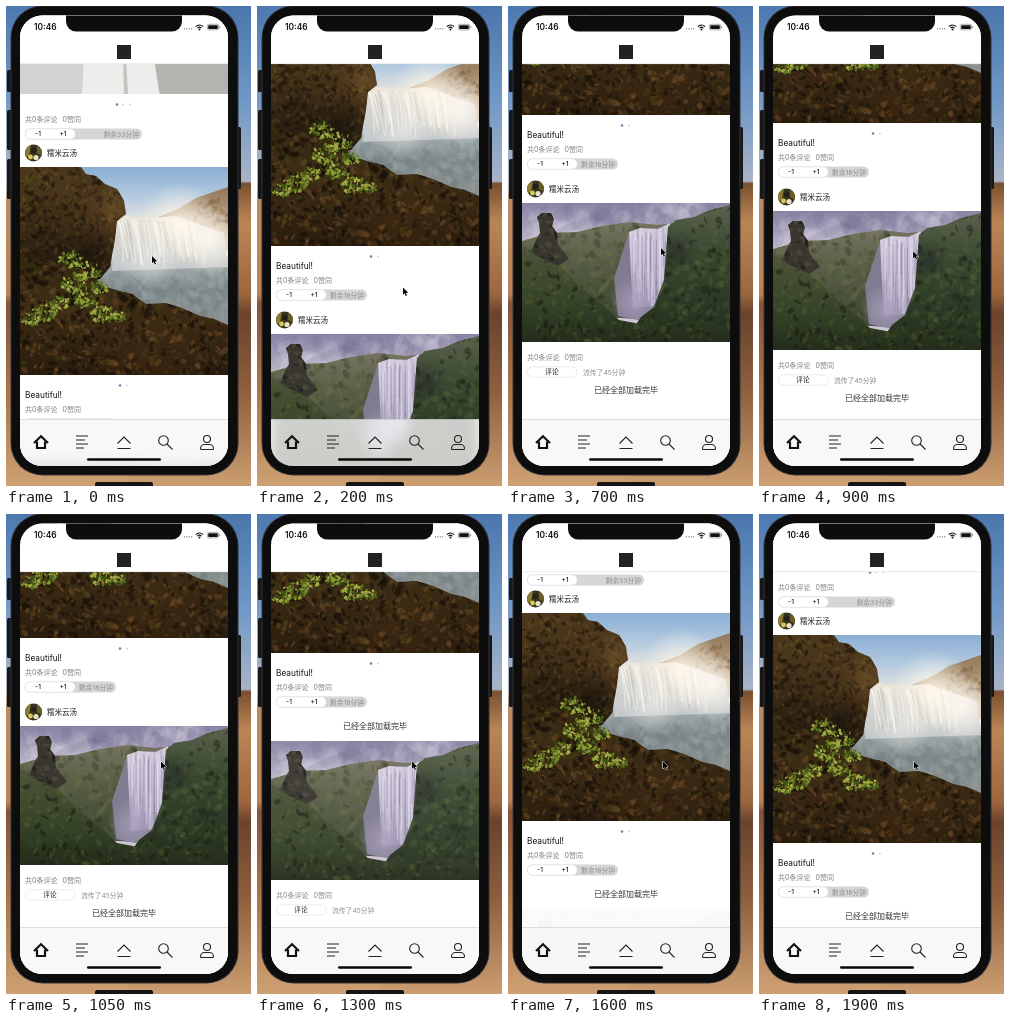
An HTML page with a canvas that plays this animation: 245x480 px, repeating every 1.95 s.

```html
<!DOCTYPE html>
<html lang="zh">
<head>
<meta charset="utf-8">
<title>Photo feed</title>
<style>
html, body { margin: 0; width: 100%; height: 100%; overflow: hidden; background: #a87a56; }
canvas { display: block; width: 100vw; height: 100vh; }
</style>
</head>
<body>
<canvas id="stage"></canvas>
<script>
const W = 245, H = 480, LOOP = 1950, STEP = 50;
const FONT = '"Inter", "Noto Sans CJK SC", "Noto Sans CJK", "Noto Sans", sans-serif';
const dpr = Math.max(1, window.devicePixelRatio || 1);
const stage = document.getElementById('stage');
const ctx = stage.getContext('2d');
stage.width = W * dpr;
stage.height = H * dpr;

const SCREEN = { x: 14, y: 9.5, w: 208, h: 450.5 };
const TAB_Y = 413;

// time, scroll offset
const SCROLL = [[0, 0], [50, -47], [100, -85], [150, -112], [200, -129], [300, -146], [400, -162],
  [500, -192], [550, -216], [600, -237], [650, -252], [700, -260], [750, -263], [800, -261],
  [900, -252], [1000, -246], [1050, -245], [1250, -245], [1350, -215], [1450, -148],
  [1550, -80], [1650, -44], [1750, -40], [1950, -40]];
const POINTER_X = [[0, 146], [200, 146], [500, 153], [700, 153], [1050, 155], [1950, 155]];
const POINTER_Y = [[0, 250], [200, 281.5], [300, 275], [500, 234], [700, 242], [1050, 247.5], [1950, 247.5]];
const REMOVE_START = 1250, REMOVE_END = 1650;

function at(keys, t) {
  for (let i = 1; i < keys.length; i++) {
    const [t0, a] = keys[i - 1], [t1, b] = keys[i];
    if (t <= t1) return a + (b - a) * (t - t0) / (t1 - t0);
  }
  return keys[keys.length - 1][1];
}

function random(seed) {
  return () => (seed = (seed * 16807) % 2147483647) / 2147483647;
}

function path(g, pts) {
  g.beginPath();
  for (let i = 0; i < pts.length; i += 2) g.lineTo(pts[i], pts[i + 1]);
  g.closePath();
}

function poly(g, color, ...pts) {
  path(g, pts);
  g.fillStyle = color;
  g.fill();
}

function round(g, x, y, w, h, r, color) {
  g.beginPath();
  g.roundRect(x, y, w, h, r);
  g.fillStyle = color;
  g.fill();
}

function dot(g, x, y, r, color) {
  g.beginPath();
  g.arc(x, y, r, 0, 7);
  g.fillStyle = color;
  g.fill();
}

function ramp(g, y0, y1, ...stops) {
  const fill = g.createLinearGradient(0, y0, 0, y1);
  for (let i = 0; i < stops.length; i += 2) fill.addColorStop(stops[i], stops[i + 1]);
  return fill;
}

function glow(g, x, y, r, rgb, a) {
  const fill = g.createRadialGradient(x, y, 0, x, y, r);
  fill.addColorStop(0, `rgba(${rgb},${a})`);
  fill.addColorStop(1, `rgba(${rgb},0)`);
  g.fillStyle = fill;
  g.fillRect(x - r, y - r, 2 * r, 2 * r);
}

function specks(g, rnd, n, x, y, w, h, size, colors) {
  for (let i = 0; i < n; i++) {
    g.beginPath();
    g.ellipse(x + rnd() * w, y + rnd() * h, size * (.4 + rnd()), size * (.2 + rnd() * .6), rnd() * 3, 0, 7);
    g.fillStyle = colors[Math.floor(rnd() * colors.length)];
    g.fill();
  }
}

function textured(g, pts, color, paint) {
  g.save();
  poly(g, color, ...pts);
  path(g, pts);
  g.clip();
  paint();
  g.restore();
}

function picture(w, h, paint) {
  const c = document.createElement('canvas');
  c.width = w * dpr;
  c.height = h * dpr;
  const g = c.getContext('2d');
  g.scale(dpr, dpr);
  paint(g);
  return c;
}

const coast = picture(208, 208, g => {
  const rnd = random(77);
  g.fillStyle = ramp(g, 0, 60, 0, '#8aaed4', .5, '#b5cbe0', 1, '#f1e9df');
  g.fillRect(0, 0, 208, 208);
  poly(g, ramp(g, 22, 80, 0, '#94795c', 1, '#d4bfa4'), 138, 50, 158, 42, 176, 31, 208, 20, 208, 84, 138, 76);
  specks(g, rnd, 60, 172, 34, 36, 24, 3, ['rgba(110,78,44,.4)', 'rgba(160,130,90,.4)']);
  g.fillStyle = ramp(g, 90, 150, 0, '#c9cfd0', .2, '#9ca6a8', .55, '#7f898b', 1, '#8a9090');
  g.fillRect(60, 90, 148, 75);
  specks(g, rnd, 80, 80, 106, 128, 45, 6, ['rgba(190,200,200,.15)', 'rgba(85,95,98,.14)']);

  // falling water and mist
  poly(g, ramp(g, 48, 104, 0, '#eee7db', .4, '#d7d5d0', 1, '#c3c9ca'),
    95, 54, 106, 49, 130, 51, 155, 49, 180, 58, 204, 66, 208, 100, 92, 104);
  for (let i = 0; i < 70; i++) {
    const x = 97 + rnd() * 80;
    g.strokeStyle = rnd() < .7 ? 'rgba(255,252,246,.45)' : 'rgba(130,130,124,.22)';
    g.lineWidth = .6 + rnd() * 1.4;
    g.beginPath();
    g.moveTo(x, 52 + rnd() * 5);
    g.quadraticCurveTo(x + 3, 65, x + 4 + rnd() * 5, 82 + rnd() * 18);
    g.stroke();
  }
  glow(g, 160, 58, 42, '255,248,234', .95);
  glow(g, 190, 72, 36, '255,250,242', .9);
  glow(g, 130, 92, 30, '240,240,236', .55);

  const cliff = [0, 0, 61, 0, 66, 7, 76, 9, 85, 17, 97, 22, 104, 34, 106, 47, 97, 54, 95, 72, 90, 100, 80, 112, 0, 130];
  textured(g, cliff, ramp(g, 0, 120, 0, '#4b371c', .5, '#443018', 1, '#21190f'), () => {
    specks(g, rnd, 500, 0, 0, 108, 115, 3.2, ['rgba(28,20,11,.6)', 'rgba(103,78,38,.5)', 'rgba(80,66,27,.5)', 'rgba(40,28,14,.6)']);
    glow(g, 93, 42, 28, '151,111,58', .35);
    glow(g, 64, 88, 30, '16,13,9', .6);
    glow(g, 25, 70, 38, '16,13,9', .4);
  });

  const shore = [0, 88, 28, 96, 50, 99, 72, 106, 80, 118, 96, 123, 112, 127, 126, 137, 146, 136, 162, 141,
    180, 149, 194, 152, 208, 158, 208, 208, 0, 208];
  textured(g, shore, ramp(g, 90, 208, 0, '#33270f', .4, '#3d2c15', 1, '#2b1d0e'), () => {
    specks(g, rnd, 800, 0, 90, 208, 118, 3.4, ['rgba(20,14,8,.65)', 'rgba(112,79,40,.5)', 'rgba(75,52,25,.65)', 'rgba(64,62,22,.5)', 'rgba(20,14,8,.55)']);
    glow(g, 130, 195, 60, '110,66,26', .18);
  });
  const leaf = ['#5d761f', '#8b9b34', '#3e5518', '#a5ad49', '#596c20'];
  const bushes = [[50, 93, 13], [67, 104, 14], [54, 117, 14], [79, 120, 9], [66, 133, 12],
    [24, 145, 13], [39, 136, 10], [82, 147, 13], [96, 149, 8], [10, 152, 10]];
  for (const [x, y, r] of bushes) {
    for (let i = 0; i < r * 4; i++) {
      const a = rnd() * 7, d = Math.sqrt(rnd()) * r;
      specks(g, rnd, 1, x + Math.cos(a) * d, y + Math.sin(a) * d * .65, 1, 1, 2, leaf);
    }
  }
});

const valley = picture(208, 139, g => {
  const rnd = random(314);
  g.fillStyle = ramp(g, 0, 42, 0, '#8883a4', .45, '#aaa5bd', 1, '#d1ccd7');
  g.fillRect(0, 0, 208, 139);
  specks(g, rnd, 45, 0, 0, 208, 28, 15, ['rgba(223,217,230,.16)', 'rgba(106,101,137,.16)']);
  textured(g, [0, 38, 28, 30, 55, 29, 80, 23, 108, 19, 135, 22, 152, 20, 152, 70, 118, 116, 0, 110],
    ramp(g, 20, 110, 0, '#74735f', .35, '#5d624a', 1, '#3b462f'), () => {
      specks(g, rnd, 260, 0, 22, 130, 90, 4, ['rgba(43,49,32,.35)', 'rgba(122,116,77,.28)', 'rgba(73,87,53,.4)']);
    });
  poly(g, '#807b90', 92, 75, 107, 30, 150, 22, 150, 100, 120, 118, 96, 113);
  textured(g, [107, 29, 118, 25, 136, 26, 148, 20, 147, 50, 141, 88, 132, 103, 111, 105, 109, 70],
    ramp(g, 24, 105, 0, '#d2cbdc', .45, '#b9b2ca', 1, '#9690ab'), () => {
      for (let i = 0; i < 65; i++) {
        const x = 107 + rnd() * 41;
        g.fillStyle = rnd() < .65 ? 'rgba(237,230,245,.36)' : 'rgba(103,94,127,.25)';
        g.fillRect(x, 22 + rnd() * 18, .5 + rnd(), 30 + rnd() * 50);
      }
    });
  glow(g, 113, 99, 27, '180,170,200', .65);
  textured(g, [146, 24, 154, 17, 172, 14, 188, 7, 208, 2, 208, 139, 102, 139, 119, 114, 132, 104, 142, 77],
    ramp(g, 0, 139, 0, '#5b624d', .35, '#394831', 1, '#232d1b'), () => {
      specks(g, rnd, 320, 110, 0, 98, 139, 4, ['rgba(24,32,20,.4)', 'rgba(92,104,60,.3)', 'rgba(63,80,43,.4)']);
      glow(g, 154, 48, 22, '33,32,39', .5);
    });
  textured(g, [0, 49, 18, 51, 42, 67, 60, 86, 81, 102, 97, 117, 118, 121, 208, 118, 208, 139, 0, 139],
    ramp(g, 50, 139, 0, '#4a5237', .5, '#38452a', 1, '#232d1b'), () => {
      specks(g, rnd, 360, 0, 50, 208, 89, 3.5, ['rgba(19,26,15,.45)', 'rgba(93,103,52,.32)', 'rgba(55,70,34,.5)']);
    });
  textured(g, [9, 50, 14, 37, 18, 30, 17, 20, 15, 14, 20, 10, 29, 10, 32, 16, 30, 23, 35, 30, 36, 41, 47, 56, 36, 63],
    '#38362f', () => specks(g, rnd, 70, 8, 8, 35, 50, 3, ['rgba(23,22,20,.5)', 'rgba(91,87,68,.4)']));
});

function text(s, x, y, size, color, align = 'left', weight = 400) {
  ctx.font = `${weight} ${size}px ${FONT}`;
  ctx.textAlign = align;
  ctx.fillStyle = color;
  ctx.fillText(s, x, y + size * .37);
}

function stats(y) {
  text('共0条评论', 19, y, 7, '#7c7c7c');
  text('0赞同', 56.5, y, 7, '#7c7c7c');
}

function outlined(x, y, w, h) {
  round(ctx, x, y, w, h, h / 2, '#fff');
  ctx.strokeStyle = '#dedede';
  ctx.lineWidth = .6;
  ctx.stroke();
}

function votes(y, right, label) {
  round(ctx, 19, y - 5.5, right - 19, 11, 5.5, '#d6d6d6');
  outlined(19.3, y - 5.2, 50, 10.4);
  text('-1', 32, y, 6.6, '#222', 'center', 500);
  text('+1', 57, y, 6.6, '#222', 'center', 500);
  text(label, right - 3, y, 6.8, '#8b8b8b', 'right');
}

function author(y) {
  ctx.save();
  dot(ctx, 27.5, y, 8.5, '#38331f');
  ctx.clip();
  poly(ctx, '#8a7c32', 19, y - 9, 25, y - 9, 23, y + 3, 19, y + 4);
  poly(ctx, '#665d29', 31, y - 9, 37, y - 7, 36, y + 3, 31, y);
  dot(ctx, 27.5, y - 2.5, 2.5, '#231f19');
  dot(ctx, 24.5, y + 4, 2.4, '#d9c95a');
  dot(ctx, 30, y + 4.5, 2.6, '#e6e0c8');
  ctx.restore();
  text('糯米云汤', 41, y, 7.5, '#1c1c1c');
}

function pager(y, ...xs) {
  xs.forEach((x, i) => dot(ctx, x, y, i ? 1 : 1.3, i ? '#d5d5dc' : '#6f82b4'));
}

function footer(y) {
  text('已经全部加载完毕', 118, y, 8, '#333', 'center');
}

function secondPost(b) {
  author(b + 74);
  ctx.drawImage(valley, 14, b + 88, 208, 139);
  stats(b + 242);
  outlined(19.3, b + 251.8, 50, 10.4);
  text('评论', 44, b + 257, 6.7, '#222', 'center', 500);
  text('流传了45分钟', 75, b + 257, 6.8, '#8b8b8b');
}

function feed(t) {
  const top = 161 + at(SCROLL, t), b = top + 208;
  const removing = t > REMOVE_START;
  const k = Math.min(1, Math.max(0, (t - REMOVE_START) / (REMOVE_END - REMOVE_START)));
  const alpha = 1 - k * k * (3 - 2 * k);

  // tail of the photo above
  ctx.fillStyle = '#d3d2d0';
  ctx.fillRect(14, top - 173, 208, 100);
  poly(ctx, '#b5b3b0', 147, top - 110, 222, top - 110, 222, top - 73, 154, top - 73);
  poly(ctx, '#ededeb', 78, top - 110, 148, top - 110, 153, top - 73, 76, top - 73);
  poly(ctx, '#c5c3c0', 117, top - 110, 120, top - 110, 122, top - 73, 118, top - 73);
  pager(top - 62.5, 111, 117, 124);
  stats(top - 48);
  votes(top - 33, 136, '剩余33分钟');
  author(top - 14);

  ctx.globalAlpha = alpha;
  if (alpha > 0) secondPost(b);
  ctx.globalAlpha = 1;
  if (removing) {
    ctx.fillStyle = '#fff';
    ctx.fillRect(14, b + 57, 208, 31);
  }
  ctx.drawImage(coast, 14, top, 208, 208);
  pager(b + 10.5, 114, 121);
  text('Beautiful!', 19, b + 20, 8.3, '#111');
  stats(b + 34);
  votes(b + 49, 110, '剩余18分钟');
  footer(b + (removing ? 73 : 275));
  return { b, alpha };
}

function tabBar({ b, alpha }) {
  ctx.save();
  ctx.beginPath();
  ctx.rect(14, TAB_Y, 208, 48);
  ctx.clip();
  ctx.fillStyle = '#fff';
  ctx.fillRect(14, TAB_Y, 208, 48);
  ctx.filter = `blur(${6 * dpr}px)`;
  if (b > TAB_Y) ctx.drawImage(coast, 14, b - 208, 208, 208);
  ctx.globalAlpha = alpha;
  if (alpha > 0 && b + 227 > TAB_Y) ctx.drawImage(valley, 14, b + 88, 208, 139);
  ctx.globalAlpha = 1;
  ctx.filter = 'none';
  ctx.fillStyle = 'rgba(247,247,247,.79)';
  ctx.fillRect(14, TAB_Y, 208, 48);
  ctx.fillStyle = 'rgba(0,0,0,.22)';
  ctx.fillRect(14, TAB_Y, 208, .5);
  ctx.restore();

  const line = (...p) => {
    ctx.beginPath();
    for (let i = 0; i < p.length; i += 2) ctx.lineTo(p[i], p[i + 1]);
    ctx.stroke();
  };
  ctx.strokeStyle = '#111';
  ctx.lineWidth = 2.2;
  line(28, 437, 35, 430.3, 42, 437);
  line(31, 435.5, 31, 442, 39, 442, 39, 435.5);
  ctx.lineWidth = 1.1;
  ctx.strokeStyle = '#222';
  [12, 9, 12, 8].forEach((w, i) => line(70, 430 + i * 4, 70 + w, 430 + i * 4));
  line(111.5, 437.5, 118, 431, 124.5, 437.5);
  line(111.5, 442.5, 124.5, 442.5);
  ctx.beginPath();
  ctx.arc(157.5, 434.5, 4.8, 0, 7);
  ctx.stroke();
  line(161, 438, 166.5, 443.5);
  ctx.beginPath();
  ctx.arc(201, 433, 3.5, 0, 7);
  ctx.stroke();
  ctx.beginPath();
  ctx.roundRect(194.5, 438.5, 13, 5, [4, 4, 1, 1]);
  ctx.stroke();
  round(ctx, 81, 452.2, 74, 2.6, 1.3, '#080808');
}

function header() {
  ctx.fillStyle = '#fff';
  ctx.fillRect(14, 9, 208, 49);
  ctx.fillStyle = '#d4d4d4';
  ctx.fillRect(14, 57.6, 208, .5);
  text('10:46', 28, 21.2, 8.4, '#111', 'left', 600);
  ctx.fillStyle = '#222';
  ctx.fillRect(111, 39, 14, 14);
  for (let i = 0; i < 4; i++) dot(ctx, 178.5 + i * 2.4, 22.8, .6, '#555');
  ctx.strokeStyle = '#111';
  ctx.lineWidth = 1.1;
  for (const r of [2.7, 5]) {
    ctx.beginPath();
    ctx.arc(193.5, 24, r, Math.PI * 1.24, Math.PI * 1.76);
    ctx.stroke();
  }
  dot(ctx, 193.5, 23.4, 1, '#111');
  ctx.lineWidth = .6;
  ctx.strokeStyle = '#777';
  ctx.beginPath();
  ctx.roundRect(201.3, 18.3, 11.4, 5.6, 1.5);
  ctx.stroke();
  round(ctx, 202.2, 19.2, 9.6, 3.8, .8, '#111');
  ctx.fillStyle = '#777';
  ctx.fillRect(213.3, 20.2, .8, 1.9);
  round(ctx, 60, 0, 116, 25.5, 10, '#0d0d0d');
}

function desktop() {
  ctx.fillStyle = ramp(ctx, 0, H, 0, '#4d79b0', .2, '#789bc6', .37, '#b1b7c6', .4, '#b98c66',
    .6, '#b98356', .62, '#835437', .8, '#a8754c', 1, '#cda073');
  ctx.fillRect(0, 0, 122, H);
  ctx.fillStyle = ramp(ctx, 0, H, 0, '#4a76ae', .2, '#7198c6', .365, '#a9b4c7', .37, '#79502f',
    .45, '#ba8556', .6, '#9c673f', .64, '#6b432c', .8, '#8d5f3e', 1, '#cb9d70');
  ctx.fillRect(122, 0, 123, H);
}

function phone() {
  for (const [y, h] of [[64, 22], [104, 40], [153, 40]]) round(ctx, 1, y, 6, h, 1.5, '#171717');
  round(ctx, 229, 121, 6, 62, 1.5, '#171717');
  round(ctx, 4.5, -.5, 228, 470, 32, '#34343a');
  round(ctx, 5.5, .5, 226, 468, 31, '#0d0d0d');
  round(ctx, 89, 476, 58, 10, 2, '#151515');
}

function pointer(x, y) {
  ctx.save();
  ctx.translate(x, y);
  path(ctx, [0, 0, 0, 7.3, 1.7, 5.8, 2.8, 8.4, 4, 7.9, 2.9, 5.4, 5.2, 5.3]);
  ctx.strokeStyle = '#fff';
  ctx.lineWidth = 1;
  ctx.stroke();
  ctx.fillStyle = '#000';
  ctx.fill();
  ctx.restore();
}

function draw(now) {
  const t = Math.floor((now % LOOP) / STEP) * STEP;
  ctx.setTransform(dpr, 0, 0, dpr, 0, 0);
  desktop();
  phone();
  ctx.save();
  ctx.beginPath();
  ctx.roundRect(SCREEN.x, SCREEN.y, SCREEN.w, SCREEN.h, 22);
  ctx.clip();
  ctx.fillStyle = '#fff';
  ctx.fillRect(14, 9, 208, 452);
  const state = feed(t);
  tabBar(state);
  header();
  ctx.restore();
  pointer(at(POINTER_X, t), at(POINTER_Y, t));
}

const start = performance.now();
function tick() {
  draw(performance.now() - start);
  requestAnimationFrame(tick);
}
tick();
</script>
</body>
</html>
```
